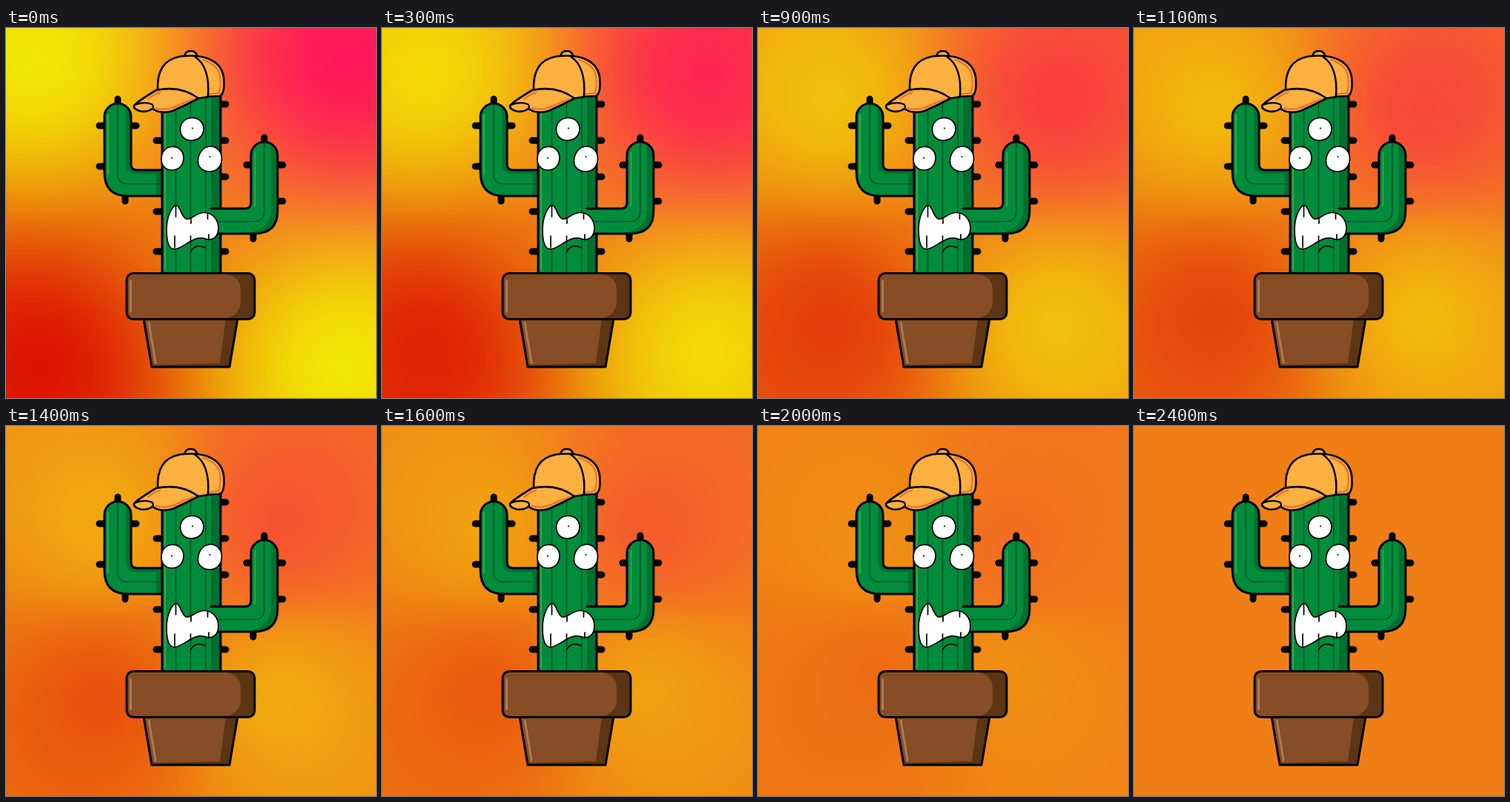
Write an HTML page with a canvas that moves like this. It is 500 px wide and 500 px high and loops after 2.5 s.

```html
<!DOCTYPE html>
<html lang="en">
<head>
<meta charset="utf-8">
<title>Cactus</title>
<style>
  html, body { margin: 0; width: 100%; height: 100%; overflow: hidden; background: #f07e16; }
  canvas, svg { position: absolute; left: 0; top: 0; width: 100%; height: 100%; display: block; }
  .ink { stroke: #000; stroke-width: 3; stroke-linejoin: round; stroke-linecap: round; }
  .line { fill: none; stroke: #000; stroke-width: 1.7; stroke-linecap: round; }
  .spike { fill: none; stroke: #000; stroke-width: 9; stroke-linecap: round; }
  .green { fill: #018c3b; }
  .shade { fill: #01702f; }
  .rib { fill: none; stroke: #01592a; stroke-width: 1.7; }
  .shine { fill: none; stroke: #35a447; stroke-width: 2; stroke-linecap: round; }
  .clay { fill: #864d26; }
  .dark { fill: #5c3514; }
  .gloss { fill: none; stroke: #a97c56; stroke-width: 3; stroke-linecap: round; }
  .cloth { fill: #fcb03f; stroke-width: 2.7; }
  .trim { fill: none; stroke: #f26a2b; stroke-width: 2; stroke-linecap: round; }
  .white { fill: #fff; stroke: #000; stroke-width: 1.7; }
</style>
</head>
<body>
<canvas id="glow" width="250" height="250"></canvas>
<svg viewBox="0 0 500 500">
  <path class="spike" d="M203 152H212M203 248H212M203 302H212M288 103H297M288 152H297M288 201H297M288 302H297
    M151 96V106M126 132H136M126 187H136M166 132H176M161 224V234
    M349 148V158M325 185H335M364 185H374M364 234H374M334 275V285"/>

  <g id="left-arm">
    <path class="green" d="M212 192H177Q169 192 169 184V120A18 18 0 0 0 133 120V195Q133 227 165 227H212Z"/>
    <path class="shade" d="M162 108Q169 113 169 122V184Q169 192 177 192H211V197H176Q162 197 162 184ZM203 192H211V227H203Z"/>
    <path class="rib" d="M151 104V198Q151 210.500 164 210.500H211"/>
    <path class="shine" d="M138 117V198"/>
    <path class="ink" fill="none" d="M212 192H177Q169 192 169 184V120A18 18 0 0 0 133 120V195Q133 227 165 227H212"/>
  </g>

  <g id="trunk">
    <path class="green" d="M211 84H290V332H211Z"/>
    <path class="shade" d="M277 84H289V332H277Z"/>
    <path class="rib" d="M229.500 84V331M249.500 84V331M270 84V331"/>
    <path class="shine" d="M215 116V327"/>
    <path class="ink" fill="none" d="M211 84V332M290 84V332"/>
  </g>

  <g id="right-arm">
    <path class="green" d="M277 244H323Q331 244 331 236V172A18 18 0 0 1 367 172V247Q367 278 335 278H277Z"/>
    <path class="shade" d="M358 159Q367 164 367 173V247Q367 278 335 278H322Q358 274 358 245Z"/>
    <path class="rib" d="M287 261.500H335Q349 261.500 349 247V156"/>
    <path class="shine" d="M336.500 168V240"/>
    <path class="ink" fill="none" d="M277 244H323Q331 244 331 236V172A18 18 0 0 1 367 172V247Q367 278 335 278H286"/>
  </g>

  <g id="pot">
    <path class="clay" d="M186 393H313L302 458H197Z"/>
    <path class="dark" d="M297 393H313L302 458H198L199 455.500L289 453Z"/>
    <path class="gloss" d="M193 398L202 452"/>
    <path class="ink" fill="none" d="M186 393H313L302 458H197Z"/>
    <rect class="dark" x="163" y="331.500" width="173" height="62" rx="9"/>
    <path class="clay" d="M172 331.500H288Q317 333 317 353V370Q317 391 290 393.500H172Q163 393.500 163 384.500V340.500Q163 331.500 172 331.500Z"/>
    <path class="gloss" d="M168.500 342V383"/>
    <rect class="ink" fill="none" x="163" y="331.500" width="173" height="62" rx="9"/>
  </g>

  <g id="face">
    <path class="white" d="M250 121.500C260 120 267 128 267 136C267 146 260 152 250 152C241 152 235 145 235.500 136C236 128 242 122 250 121.500Z"/>
    <path class="white" d="M224 160.500C233 159 240 167 240 175C240 185 234 192 224 192C215 192 209.500 185 210 177C210 168 215 161 224 160.500Z"/>
    <path class="white" d="M275 160C285 159 292 168 291.500 177C291 188 284 194 276 194C266 194 258.500 188 259.500 179C260 169 266 161 275 160Z"/>
    <circle cx="252" cy="135.500" r="1.100"/>
    <circle cx="224" cy="175.500" r="1.100"/>
    <circle cx="275.500" cy="174" r="1.100"/>
    <path class="white" d="M217 272C217 255 225 238 231 240C236 242 237 256 244 258C252 259 256 249.500 268 249.500C280 249.500 287 260 287 270C287 282 280 288 270 285C255 280 245 293 232 298C220 302 217 290 217 272Z"/>
    <path class="line" d="M229.500 241V255M250 256V264M272.500 251V258M228 281V297M249.500 281V289M274 279V286M249.500 302Q257 290.500 269 297"/>
  </g>

  <g id="cap">
    <path class="cloth ink" d="M241 39Q242 31 250 31Q257 31 258.500 39Z"/>
    <path class="cloth ink" d="M205 84C204 62 210 43 235 38.500C262 35 294 40 294.500 72C295 83 293 91 288 92Q274 92 261 95Q235 92 205 84Z"/>
    <path class="trim" d="M266 43Q284 48 289 63Q291 77 288 88M272 90L287 88"/>
    <path class="line" style="stroke-width:2.500" d="M255 38.500Q276 52 273 93"/>
    <path class="cloth ink" d="M173 105Q178 99 203 84Q236 77 260 95Q244 104 225 112Q209 117 198 109Q191 114 182 112.500Q172 110 173 105Z"/>
    <path class="trim" d="M202 108Q216 112 229 106T254 96M192 96Q199 90 208 87"/>
    <path class="line" style="stroke-width:2.300" d="M174 104Q187 99 197 103Q201 106 197 109.500"/>
  </g>
</svg>
<script>
const STEP = 100, STEPS = 25, SIZE = 250;
const ctx = document.getElementById('glow').getContext('2d');
const image = ctx.createImageData(SIZE, SIZE);
const average = [240, 126, 22];
const spots = [
  { sx: -1, sy: -1, color: [242, 230, 4] },
  { sx: 1, sy: -1, color: [255, 24, 88] },
  { sx: -1, sy: 1, color: [221, 20, 2] },
  { sx: 1, sy: 1, color: [242, 230, 4] }
];

// Four spots drift inwards while their colours fade to the shared average.
function paint(step) {
  const fade = step / (STEPS - 1);
  const reach = 208 - 146 * fade;
  const bias = 0.05 + 0.15 * fade;
  const px = image.data;
  for (let j = 0, i = 0; j < SIZE; j++) {
    const y = (j + 0.5) * 500 / SIZE - 250;
    for (let k = 0; k < SIZE; k++, i += 4) {
      const x = (k + 0.5) * 500 / SIZE - 250;
      const r = Math.hypot(x, y);
      const bx = bias * Math.tanh(6 * x / r), by = bias * Math.tanh(6 * y / r);
      let total = 0, red = 0, green = 0, blue = 0;
      for (const { sx, sy, color } of spots) {
        const dx = x - sx * reach, dy = y - sy * reach;
        const w = (1 + sx * bx) * (1 + sy * by) / (dx * dx + dy * dy + 1);
        total += w;
        red += w * color[0];
        green += w * color[1];
        blue += w * color[2];
      }
      const mix = (sum, c) => sum / total * (1 - fade) + average[c] * fade;
      px[i] = mix(red, 0);
      px[i + 1] = mix(green, 1);
      px[i + 2] = mix(blue, 2);
      px[i + 3] = 255;
    }
  }
  ctx.putImageData(image, 0, 0);
}

const start = performance.now();
let shown = -1;
function tick() {
  const step = Math.floor((performance.now() - start) / STEP) % STEPS;
  if (step !== shown) paint(shown = step);
  requestAnimationFrame(tick);
}
tick();
</script>
</body>
</html>
```
